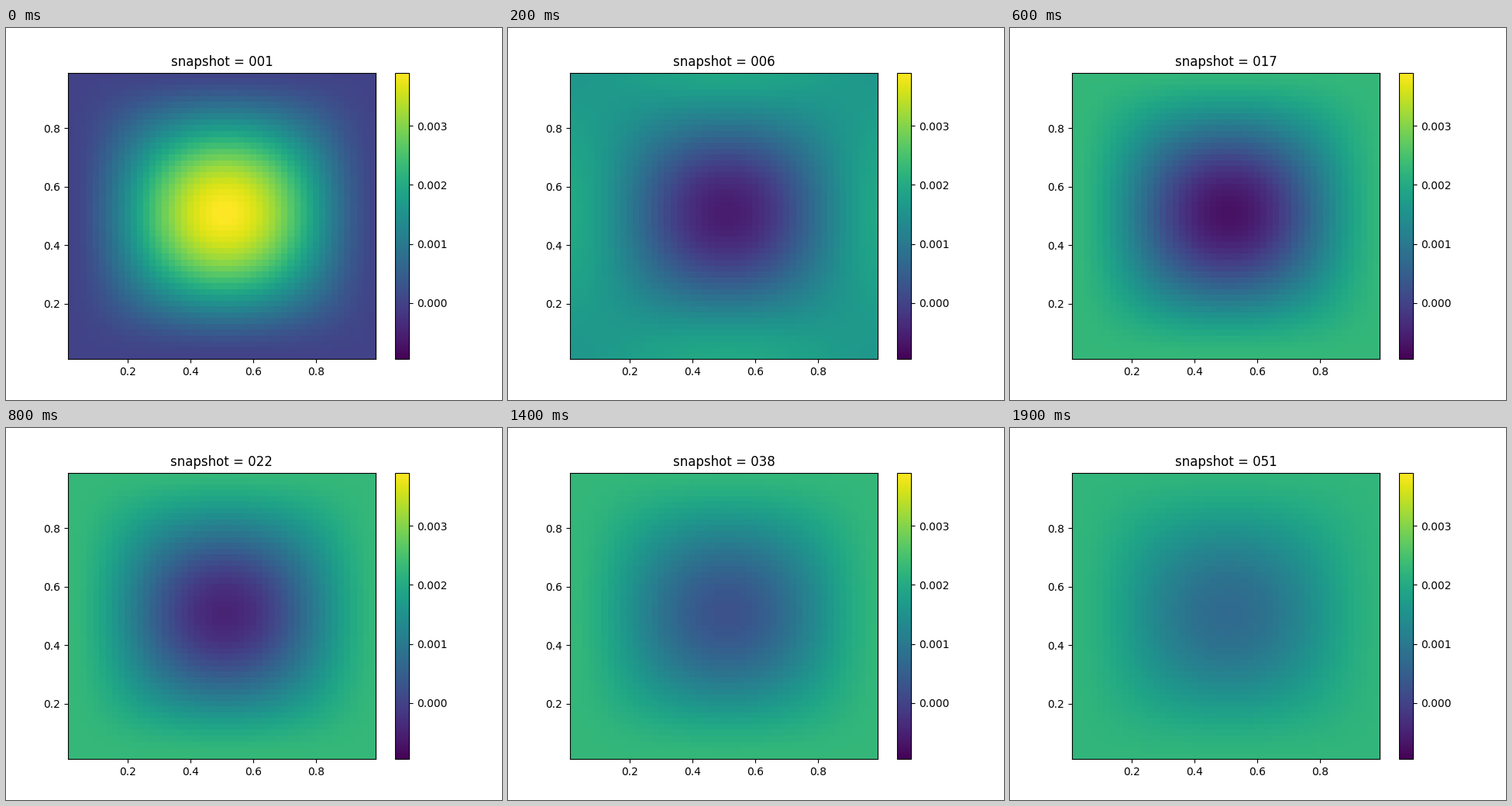
Animation of 640 by 480 pixels, one loop 2000 ms. Source, as a matplotlib script:

```python
from math import exp

import numpy as np
import matplotlib.pyplot as plt
from matplotlib.animation import FuncAnimation

plt.rcParams["text.kerning_factor"] = 6

FRAMES, INTERVAL = 20, 100
LAST = 51
N = 50
VMIN, VMAX = -0.00095, 0.0039

nodes = (np.arange(N) + 0.5) / N
bump = 16 * nodes[:-1] ** 2 * (1 - nodes[:-1]) ** 2
bx, by = np.meshgrid(bump, bump)


def field(s):
    """Bump that collapses fast, spreads to the walls and slowly refills."""
    t = s - 1
    corner = 2.37 * exp(-s / 800) * (1 - exp(-t / 4.3))
    rise = 1.28 * t * exp(-t / 1.72)  # extra height at the middle of each wall
    centre = 2.2 - 4.06 * exp(-t / 50) + 5.76 * exp(-t / 2.68)
    peak = centre - corner - 2 * rise
    return (corner + rise * (bx + by) + peak * bx * by) / 1000


fig, ax = plt.subplots(figsize=(6.4, 4.8), dpi=100)
mesh = ax.pcolormesh(nodes, nodes, field(1), cmap="viridis",
                     vmin=VMIN, vmax=VMAX, shading="flat")
ticks = np.arange(1, 5) / 5
ax.set(xticks=ticks, yticks=ticks,
       xlim=nodes[[0, -1]], ylim=nodes[[0, -1]])
fig.colorbar(mesh, ax=ax, ticks=np.arange(4) / 1000, format="%.3f")
title = ax.set_title("snapshot = 001")


def update(i):
    s = round(1 + (LAST - 1) * i / (FRAMES - 1))
    mesh.set_array(field(s))
    title.set_text(f"snapshot = {s:03d}")
    return mesh, title


anim = FuncAnimation(fig, update, frames=FRAMES, interval=INTERVAL,
                     repeat=True, repeat_delay=0)
plt.show()
```
